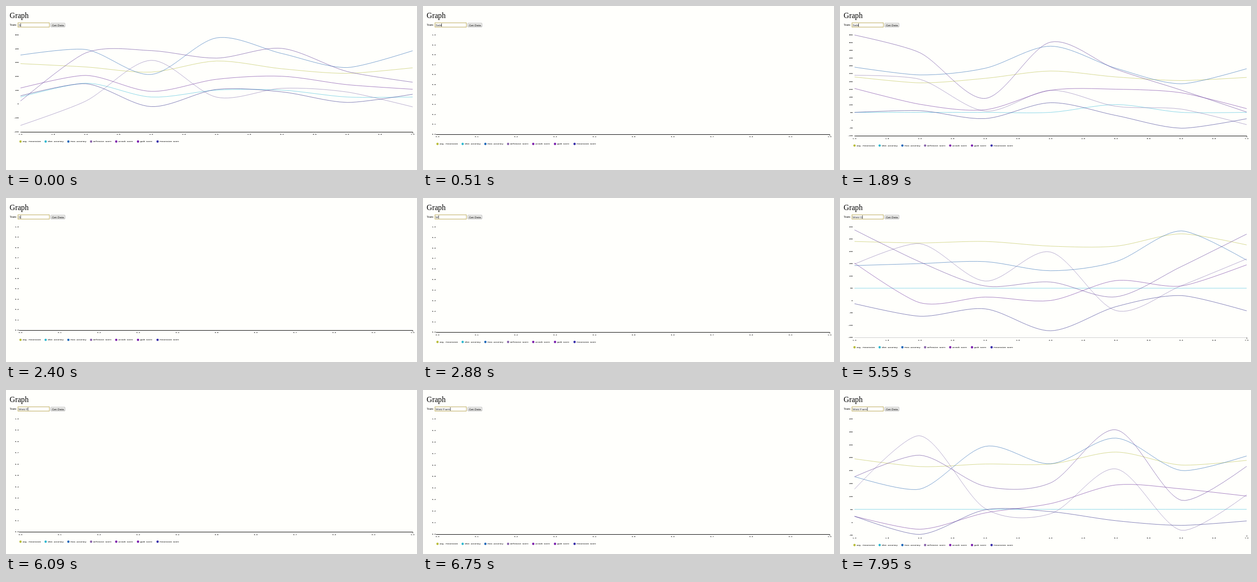
These frames come from a looping animation (850x340 px, 8000 ms). An HTML page:

```html
<!DOCTYPE html>
<html lang="en">
<head>
<meta charset="utf-8">
<title>Graph</title>
<style>
html, body { margin: 0; width: 850px; height: 340px; overflow: hidden; background: #fffffc; }
svg { position: absolute; left: 0; top: 0; }
.serif { font-family: "Liberation Serif", Times, serif; }
.sans { font-family: "Liberation Sans", Arial, sans-serif; }
.mono { font: bold 4.15px "Liberation Mono", "Courier New", monospace; fill: #222; }
.line { fill: none; stroke-width: .65; }
#field {
  position: absolute; left: 26px; top: 35px; height: 9px;
  font-size: 6.17px; line-height: 9px; color: #222; white-space: pre;
}
#caret { position: absolute; left: 100%; top: 1px; width: 1px; height: 7px; background: #555; }
</style>
</head>
<body>
<svg width="850" height="340" viewBox="0 0 850 340">
  <defs>
    <linearGradient id="face" x2="0" y2="1">
      <stop stop-color="#f6f6f4"/><stop offset="1" stop-color="#dcdcda"/>
    </linearGradient>
  </defs>
  <text class="serif" x="7.6" y="25" font-size="15.7">Graph</text>
  <text class="serif" x="7.8" y="41.2" font-size="5.8">Team:</text>
  <rect x="24.8" y="34.9" width="64.8" height="8.8" fill="#fff" stroke="#c3b36c" stroke-width="1.2"/>
  <rect x="92.5" y="35.5" width="29.5" height="8" rx="1" fill="url(#face)" stroke="#aaa" stroke-width=".8"/>
  <text class="sans" x="95" y="41.6" font-size="6.15" fill="#111">Get Data</text>
  <g id="plot"></g>
</svg>
<div id="field" class="sans"><span id="typed"></span><i id="caret"></i></div>
<script>
const LOOP = 8000, LEFT = 30, RIGHT = 841, TOP = 59.5;

// legend label, dot x, dot colour, line colour
const series = [
  ["Avg. Possession", 30, "#b9bd3c", "#bcc050"],
  ["Shot Accuracy", 82, "#2fb8cf", "#45bfdc"],
  ["Pass Accuracy", 129, "#2068b8", "#2f6db5"],
  ["Defensive Score", 176, "#8a65ab", "#8d7bb4"],
  ["Attack Score", 228, "#7f22ac", "#71369f"],
  ["Quib Score", 273, "#7a1fae", "#64409a"],
  ["Possession Score", 313.5, "#352aa8", "#38358f"]
];
const flat = Array(7).fill(50);

const views = {
  empty: { max: 1, min: 0, step: .1, axis: "#000", rows: [] },
  first: { max: 500, min: -200, step: 100, axis: "#000", rows: [
    [291, 267, 230, 310, 254, 221, 261],
    [50, 150, 50, 100, 100, 50, 50],
    [353, 393, 213, 477, 364, 263, 384],
    [-155, 21, 315, 49, 113, 86, -21],
    [115, 206, 91, 178, 200, 139, 106],
    [21, 369, 385, 331, 401, 234, 157],
    [59, 146, -19, 105, 87, 11, 70]] },
  second: { max: 550, min: -100, step: 50, axis: "#000", rows: [
    [278, 240, 269, 316, 278, 255, 275],
    [50, 50, 50, 50, 100, 50, 50],
    [341, 291, 334, 476, 334, 234, 331],
    [289, 263, 58, 192, 89, 71, -29],
    [204, 102, 67, 192, 199, 176, 74],
    [548, 434, 140, 502, 328, 193, 52],
    [50, 61, 10, 112, 30, -52, 9]] },
  third: { max: 300, min: -150, step: 50, axis: "#ccc", rows: [
    [240, 234, 240, 221, 221, 271, 226],
    flat,
    [142, 150, 158, 121, 158, 283, 164],
    [148, 231, 79, 197, -41, 60, 169],
    [152, -9, 14, 0, 81, 59, 145],
    [287, 157, 59, 75, 15, 138, 270],
    [-13, -64, -34, -123, -25, 20, -42]] },
  fourth: { max: 400, min: -50, step: 50, axis: "none", rows: [
    [245, 215, 225, 225, 271, 221, 239],
    flat,
    [176, 128, 293, 226, 325, 200, 256],
    [128, 334, 53, 33, 206, -31, 106],
    [23, -27, 36, 72, 144, 129, 101],
    [176, 259, 139, 152, 357, 85, 216],
    [23, -47, 48, 41, 6, -12, 5]] }
};

// time, view, axis height, slide duration
const redraws = [
  [0, "first", 261, 0], [330, "empty", 266, 90], [540, "second", 269.3, 0],
  [2070, "empty", 274, 90], [2400, "empty", 278.5, 90],
  [3450, "empty", 282.5, 90], [3885, "empty", 287.5, 75], [4500, "third", 289.5, 0],
  [5580, "empty", 294.5, 90], [6450, "empty", 299, 90], [6990, "fourth", 301.5, 0]
];

const typing = [
  [0, "S"], [90, "Sa"], [300, "Sab"], [420, "Sabl"], [570, "Sable"],
  [1890, "Sabl"], [2010, "Sab"], [2160, "Sa"], [2310, "S"], [2460, ""],
  [2850, "W"], [3030, "Wo"], [3210, "Wol"], [3390, "Wold"], [3540, "Wold "],
  [3720, "Wold G"], [3930, "Wold Ge"], [4260, "Wold Gem"],
  [5400, "Wold Ge"], [5550, "Wold G"], [5700, "Wold "],
  [6090, "Wold F"], [6420, "Wold Fa"], [6600, "Wold Far"], [6750, "Wold Farm"]
];
const caretOff = [[1050, 1500], [4980, 5400], [7470, 7950]];

const $ = id => document.getElementById(id);
const label = (x, y, text, anchor) =>
  `<text class="mono" x="${x}" y="${y + 1.4}" text-anchor="${anchor}">${text}</text>`;
const lastIndex = (list, t) => list.findLastIndex(e => e[0] <= t);

// cardinal spline with tension 0.7
function spline(p) {
  const n = p.length - 1;
  const tan = p.map((_, i) => [0, 1].map(k =>
    i && i < n ? .15 * (p[i + 1][k] - p[i - 1][k]) : 0));
  const off = (i, f) => [p[i][0] + f * tan[i][0], p[i][1] + f * tan[i][1]];
  let d = `M${p[0]}Q${off(1, -2 / 3)} ${p[1]}`;
  for (let i = 2; i < n; i++) d += `C${off(i - 1, 1)} ${off(i, -1)} ${p[i]}`;
  return d + `Q${off(n - 1, 2 / 3)} ${p[n]}`;
}

function plot(name, base) {
  const v = views[name], bottom = base - .5;
  const y = val => TOP + (v.max - val) / (v.max - v.min) * (bottom - TOP);
  const bare = name === "empty";
  const digits = bare ? 1 : 0;
  let out = "";

  const rows = Math.round((v.max - v.min) / v.step);
  for (let i = 0; i <= rows; i++) {
    const val = v.max - i * v.step;
    out += label(26.3, y(val), Math.abs(val).toFixed(digits).replace(/^/, val < -.01 ? "-" : ""), "end");
  }

  const cols = bare ? 10 : 12;
  for (let i = 0; i <= cols; i++) {
    const val = bare ? i / 10 : 1 + i / 2;
    out += label(LEFT + (RIGHT - LEFT) * i / cols, base + 5, val.toFixed(1), "middle");
  }

  const row = Math.floor(base) + .5;
  out += `<path d="M${bare ? 27 : LEFT} ${row}H${RIGHT}" stroke="${v.axis}"/>` +
    `<path d="M${RIGHT + .5} ${row - .5}v3.5" stroke="#333" stroke-width=".8"/>`;

  v.rows.forEach((vals, s) => {
    const pts = vals.map((val, i) => [LEFT + (RIGHT - LEFT) * i / 6, y(val)]);
    out += `<path class="line" stroke="${series[s][3]}" d="${spline(pts)}"/>`;
  });

  for (const [text, x, dot] of series) {
    out += `<circle cx="${x}" cy="${base + 20}" r="2.4" fill="${dot}"/>` +
      label(x + 4.6, base + 20, text, "start");
  }
  return out;
}

let shown = "";
function draw(t) {
  const i = lastIndex(redraws, t);
  const [at, name, end, span] = redraws[i];
  const start = i ? redraws[i - 1][2] : end;
  const base = start + (end - start) * (span ? Math.min(1, (t - at) / span) : 1);
  const key = name + base;
  if (key !== shown) {
    $("plot").innerHTML = plot(name, base);
    shown = key;
  }
  $("typed").textContent = typing[lastIndex(typing, t)][1];
  $("caret").style.opacity = caretOff.some(([a, b]) => t >= a && t < b) ? 0 : 1;
}

const origin = performance.now();
function tick() {
  draw((performance.now() - origin) % LOOP);
  requestAnimationFrame(tick);
}
tick();
</script>
</body>
</html>
```
